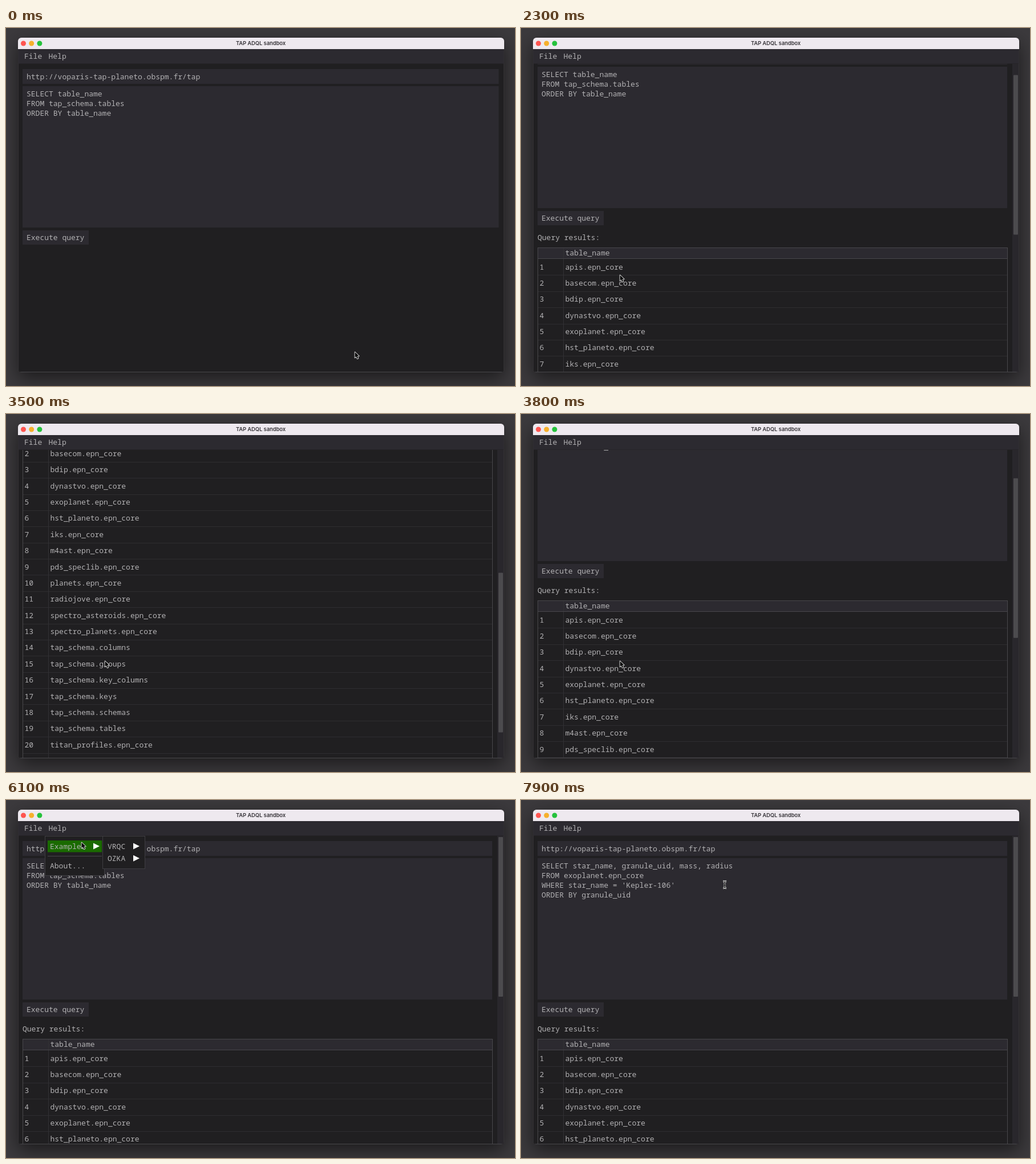
Write an HTML page with a canvas that moves like this. It is 892 by 628 pixels and loops after 8 s.

```html
<!DOCTYPE html>
<html lang="en">
<head>
<meta charset="utf-8">
<title>TAP ADQL sandbox</title>
<style>
  html, body { margin: 0; width: 100%; height: 100%; overflow: hidden; background: #3a383b; }
  canvas { display: block; }
</style>
</head>
<body>
<canvas id="stage" width="892" height="628"></canvas>
<script>
const ctx = document.getElementById('stage').getContext('2d');
const LOOP = 8000, STEP = 100;
const BG = '#201f21', FRAME = '#2c2a30', TEXT = '#b2b1b3', GREEN = '#1a6a00', LINE = '#48474b', DIM = '#2e2d30';
const ROW = 28.38, HEAD = 419, BODY = 439;

const epn = names => names.split(' ').map(n => n + '.epn_core');
const schema = names => names.split(' ').map(n => 'tap_schema.' + n);
const tables = [
  ...epn('apis basecom bdip dynastvo exoplanet hst_planeto iks m4ast pds_speclib planets radiojove spectro_asteroids spectro_planets'),
  ...schema('columns groups key_columns keys schemas tables'),
  ...epn('titan_profiles tnosarecool vims_satellites vvex')
];
const firstQuery = ['SELECT table_name', 'FROM tap_schema.tables', 'ORDER BY table_name'];
const nextQuery = ['SELECT star_name, granule_uid, mass, radius', 'FROM exoplanet.epn_core',
  "WHERE star_name = 'Kepler-106'", 'ORDER BY granule_uid'];
const examples = ['All available tables', 'All available columns in a table', 'Total number of stars',
  'Total number of planets', 'Planets in the system and their parameters', 'Star with highest metallicity'];

// Keys are [time, values...]
const pointer = [
  [0, 611, 568], [200, 313, 406], [300, 313, 406], [800, 108, 370], [1100, 105, 368], [1600, 105, 368],
  [1900, 173, 433], [4100, 173, 433], [4700, 151, 107], [4900, 151, 107], [5200, 92, 50], [5400, 90, 54],
  [5600, 84, 74], [5800, 80, 73], [5900, 144, 74], [6000, 144, 74], [6100, 132, 74], [6300, 190, 78],
  [6500, 226, 82], [6700, 226, 82], [6800, 270, 88], [7100, 370, 148], [7600, 380, 160], [7800, 382, 160],
  [7900, 357, 148.5]
];
const scrolling = [
  [2200, 0], [2300, 34], [2500, 330], [2600, 450], [2700, 498], [3400, 498],
  [3500, 412], [3800, 92], [3900, 24], [4000, 0]
];

function at(keys, t) {
  const i = keys.findIndex(k => k[0] > t);
  if (i === 0) return keys[0].slice(1);
  if (i < 0) return keys[keys.length - 1].slice(1);
  const a = keys[i - 1], b = keys[i], p = (t - a[0]) / (b[0] - a[0]);
  return a.slice(1).map((v, j) => v + (b[j + 1] - v) * p);
}

const inside = (x, y, l, t, r, b) => x >= l && x < r && y >= t && y < b;

function box(l, t, r, b, fill) {
  ctx.fillStyle = fill;
  ctx.fillRect(l, t, r - l, b - t);
}

function label(s, x, middle) {
  ctx.fillStyle = TEXT;
  ctx.fillText(s, x, Math.round(middle + 4));
}

function path(points, fill) {
  ctx.beginPath();
  points.forEach(p => ctx.lineTo(...p));
  ctx.closePath();
  ctx.fillStyle = fill;
  ctx.fill();
}

function windowFrame() {
  box(0, 0, 892, 628, '#3c3a3d');
  ctx.save();
  ctx.shadowColor = 'rgba(0,0,0,.55)';
  ctx.shadowBlur = 32;
  ctx.shadowOffsetY = 10;
  ctx.beginPath();
  ctx.roundRect(21, 17, 852, 587, 6);
  ctx.fillStyle = LINE;
  ctx.fill();
  ctx.restore();
  ctx.save();
  ctx.clip();
  box(21, 17, 873, 37, '#eee9ef');
  box(21.5, 37, 872.5, 603, BG);
  ctx.restore();
  ['#fe5550', '#f6b02c', '#25c23c'].forEach((c, i) => {
    ctx.beginPath();
    ctx.arc(30.5 + i * 14.2, 27, 4.5, 0, 7);
    ctx.fillStyle = c;
    ctx.fill();
  });
  ctx.font = '600 9.3px Inter, sans-serif';
  ctx.textAlign = 'center';
  ctx.fillStyle = '#353237';
  ctx.fillText('TAP ADQL sandbox', 446.5, 30);
  ctx.textAlign = 'left';
  ctx.font = '300 13px "Noto Sans Mono", "Liberation Mono", monospace';
}

function content(s, x, y, query, results, menuOpen) {
  const right = results ? 852 : 863.5;
  const hover = (...area) => !menuOpen && inside(x, y + s, ...area);
  ctx.save();
  ctx.beginPath();
  ctx.rect(22, 63, 850, 540);
  ctx.clip();
  ctx.translate(0, -s);
  box(29, 72, right, 98, FRAME);
  label('http://voparis-tap-planeto.obspm.fr/tap', 36, 86);
  box(29, 102, right, 350, FRAME);
  query.forEach((line, i) => label(line, 36, 116 + i * 17));
  box(29, 355, 145, 380, hover(29, 355, 145, 380) ? GREEN : FRAME);
  label('Execute query', 36, 368);
  if (results) {
    const end = BODY + tables.length * ROW;
    label('Query results:', 29, 402);
    box(29, HEAD, 853, BODY, FRAME);
    if (hover(74, HEAD, 853, BODY)) box(74, HEAD, 853, BODY, GREEN);
    label('table_name', 77.5, 429);
    tables.forEach((name, i) => {
      const top = BODY + i * ROW;
      if (i) box(30, Math.round(top), 852, Math.round(top) + 1, DIM);
      label(i + 1, 32.5, top + 14.5);
      label(name, 77.5, top + 14.5);
    });
    box(74, HEAD, 75, end, '#323134');
    box(29, BODY - 1, 853, BODY, LINE);
    ctx.strokeStyle = LINE;
    ctx.lineWidth = 1;
    ctx.strokeRect(29.5, HEAD + .5, 823, end - HEAD);
  }
  ctx.restore();
  if (results) {
    box(861, 63, 872, 603, '#29272c');
    ctx.beginPath();
    ctx.roundRect(863, 65 + s * .518, 8, 280, 1);
    ctx.fillStyle = '#4c4b4e';
    ctx.fill();
  }
}

function popup(l, r, b) {
  box(l, 63, r, b, '#3f3e42');
  box(l + 1, 64, r - 1, b - 1, BG);
}

function item(s, i, l, r, x, y, opened, arrow) {
  const top = 71 + i * 21.3;
  if (inside(x, y, l, top, r, top + 21)) box(l, top, r, top + 20.5, GREEN);
  else if (opened) box(l, top, r, top + 20.5, FRAME);
  label(s, l + (arrow ? 4 : 3), top + 10.5);
  if (arrow) path([[arrow, top + 4.5], [arrow + 11, top + 10], [arrow, top + 15.5]], '#fff');
}

function menus(t, x, y) {
  const sub = t >= 5700, list = t >= 6400;
  popup(68, 173, 133);
  item('Examples', 0, 73, 168, x, y, sub, 153);
  box(73, 98, 168, 99, LINE);
  label('About...', 77, 116);
  if (sub) {
    popup(169, 244, 121);
    item('VRQC', 0, 174, 238, x, y, list, 223);
    item('OZKA', 1, 174, 238, x, y, false, 223);
  }
  if (list) {
    popup(240, 612, 206);
    examples.forEach((s, i) => item(s, i, 246, 606, x, y));
  }
}

function cursor(x, y, beam) {
  ctx.save();
  ctx.translate(x, y);
  ctx.lineJoin = 'round';
  ctx.strokeStyle = '#f2f2f2';
  if (beam) {
    const stem = new Path2D('M-3-6Q0-6 0-4V4Q0 6-3 6M3-6Q0-6 0-4V4Q0 6 3 6M-1.5 1H1.5');
    ctx.lineWidth = 2.8;
    ctx.stroke(stem);
    ctx.lineWidth = 1;
    ctx.strokeStyle = '#111';
    ctx.stroke(stem);
  } else {
    const arrow = new Path2D('M.5.5V10.3L2.8 8.2L4.6 12.2L6.3 11.4L4.6 7.5H7.7Z');
    ctx.lineWidth = 1.7;
    ctx.stroke(arrow);
    ctx.fillStyle = '#080808';
    ctx.fill(arrow);
  }
  ctx.restore();
}

function draw(now) {
  const t = Math.floor(now % LOOP / STEP) * STEP;
  const [x, y] = at(pointer, t), [s] = at(scrolling, t);
  const menuOpen = t >= 5300 && t < 7700;
  windowFrame();
  box(21.5, 37, 872.5, 62.5, FRAME);
  if (inside(x, y, 70, 38, 110, 62)) box(71, 40, 109, 60, GREEN);
  label('File', 32, 50);
  label('Help', 74.5, 50);
  content(s, x, y, t < 7700 ? firstQuery : nextQuery, t >= 1000, menuOpen);
  if (menuOpen) menus(t, x, y);
  const overText = inside(x, y + s, 29, 72, 852, 98) || inside(x, y + s, 29, 102, 852, 350);
  cursor(x, y, overText && !menuOpen);
  requestAnimationFrame(tick);
}

const start = performance.now();
function tick() { draw(performance.now() - start); }
tick();
</script>
</body>
</html>
```
